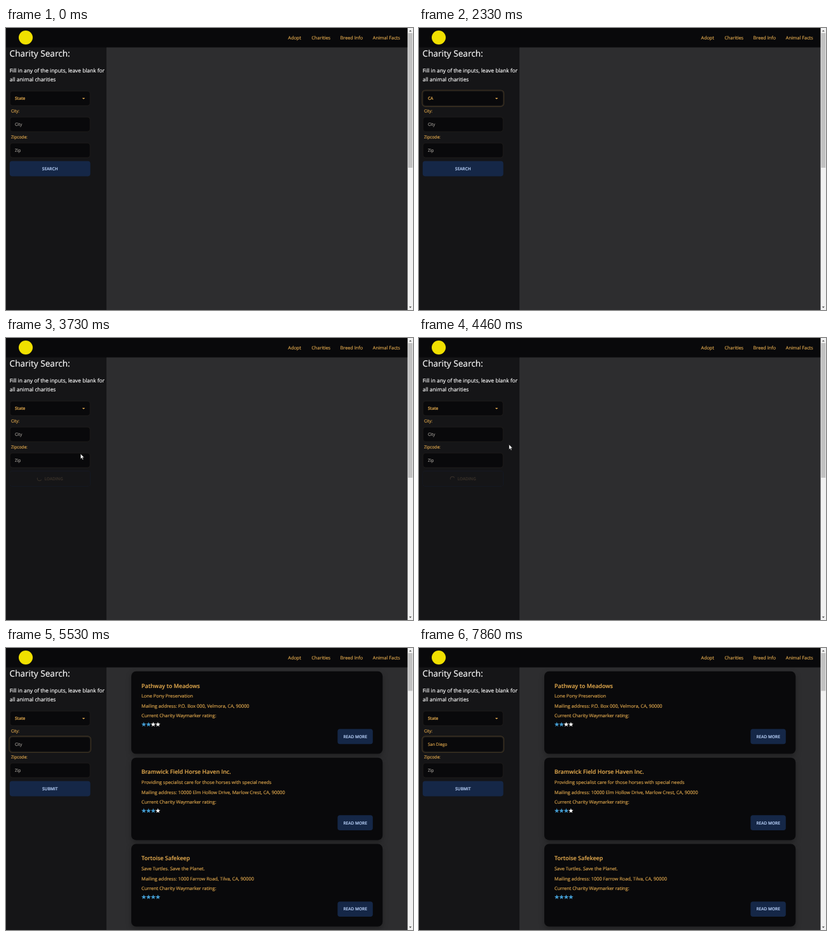
An HTML page for the animation above (8000 ms loop, 640 by 444 pixels).

```html
<!DOCTYPE html>
<html lang="en">
<head>
<meta charset="utf-8">
<title>Charity search</title>
<style>
  html, body { margin: 0; width: 100%; height: 100%; overflow: hidden; background: #2d2d2f; }
  svg { display: block; width: 640px; height: 444px; }
  text { font-family: "Open Sans", "Noto Sans", sans-serif; color: #dca54c; fill: currentColor; stroke: currentColor;
    stroke-width: .17; text-rendering: geometricPrecision; white-space: pre; }
  .semi { font-weight: 600; }
  .mid { text-anchor: middle; }
  .white { color: #fff; }
  .hint { color: #a09c96; }
  .action { color: #b5cdf5; }
  .muted { color: #3a322a; }
  .field { fill: #09090b; stroke: #292523; stroke-width: .6; }
  .focus { fill: none; stroke: #dca54c; stroke-opacity: .22; stroke-width: 1.1; }
  .card { fill: #09090b; filter: drop-shadow(0 4px 4px #0004); }
  .pointer { fill: #fff; stroke: #111; stroke-width: .6; stroke-linejoin: round; }
</style>
</head>
<body>
<svg id="stage" viewBox="0 0 640 444"></svg>
<script>
const LOOP = 8000, LOADING = 3330, RESULTS = 4530, CITY_FOCUS = 5000, HIDE_POINTER = 5530;

const rect = (x, y, w, h, fill, r = 0, more = "") =>
  `<rect x="${x}" y="${y}" width="${w}" height="${h}" rx="${r}" fill="${fill}" ${more}/>`;
const text = (x, y, size, words, cls = "", id = "") =>
  `<text x="${x}" y="${y}" font-size="${size}" class="${cls}" id="${id}">${words}</text>`;
const field = y => rect(6.2, y, 126, 23, "", 4, 'class="field"');
const focusRing = (id, y) => rect(4.9, y - 1.3, 128.6, 25.6, "none", 5, `class="focus" id="${id}"`);
const wideButton = (fill, more) => rect(5.8, 209.6, 126.8, 23.8, fill, 3.8, more);

function star(x, y, fill) {
  const points = Array.from({ length: 10 }, (_, i) => {
    const a = i * Math.PI / 5, r = i % 2 ? 1.65 : 4;
    return [x + r * Math.sin(a), y - r * Math.cos(a)].map(v => v.toFixed(2));
  });
  return `<polygon points="${points.join(" ")}" fill="${fill}"/>`;
}

function card({ name, about, address, stars }, index) {
  const rating = [0, 1, 2, 3].map(i => star(216.7 + i * 7.4, 120.4, i < stars ? "#439bd0" : "#fff"));
  return `<g transform="translate(0 ${index * 135.9})">
    ${rect(197, 36.8, 395.2, 129.8, "", 7.4, 'class="card"')}
    ${text(213, 62.6, 8.95, name, "semi")}
    ${text(213, 78.2, 7.36, about)}
    ${text(213, 93.8, 7.36, "Mailing address: " + address)}
    ${text(213, 109.4, 7.36, "Current Charity Waymarker rating:")}
    ${rating.join("")}
    ${rect(521.4, 127.4, 55.4, 23.8, "#152747", 3.8)}
    ${text(549.1, 141.7, 6.5, "READ MORE", "semi mid action")}</g>`;
}

const charities = [
  { name: "Pathway to Meadows", about: "Lone Pony Preservation", stars: 2,
    address: "P.O. Box 000, Velmora, CA, 90000" },
  { name: "Bramwick Field Horse Haven Inc.", about: "Providing specialist care for those horses with special needs", stars: 3,
    address: "10000 Elm Hollow Drive, Marlow Crest, CA, 90000" },
  { name: "Tortoise Safekeep", about: "Save Turtles. Save the Planet.", stars: 4,
    address: "1000 Farrow Road, Tilva, CA, 90000" }
];
const menu = [["Adopt", 443.6], ["Charities", 480.4], ["Breed Info", 525.6], ["Animal Facts", 576.8]];

stage.innerHTML = `
  ${rect(0, 0, 640, 444, "#2d2d2f")}
  ${rect(0, 30, 158, 414, "#151517")}
  <g id="results">${charities.map(card).join("")}</g>
  ${rect(0, 0, 632, 30.5, "#09090b")}
  <circle cx="31" cy="15" r="11" fill="#f0e000"/>
  ${menu.map(([label, x]) => text(x, 17.9, 7.3, label)).join("")}
  ${text(5.6, 45.1, 13.6, "Charity Search:", "white")}
  ${text(5.8, 70, 8.35, "Fill in any of the inputs, leave blank for", "white")}
  ${text(5.8, 83.6, 8.35, "all animal charities", "white")}
  ${field(99.3)}${field(140.2)}${field(181.1)}
  ${focusRing("stateRing", 99.3)}${focusRing("cityRing", 140.2)}
  ${text(14, 113.1, 6.5, "", "semi", "state")}
  <path d="M119.8 109.9h4.4l-2.2 2.3z" fill="#dca54c"/>
  ${text(7.9, 133.4, 6.55, "City:")}
  ${text(14, 154.3, 6.5, "", "", "city")}
  ${text(7.9, 174.3, 6.55, "Zipcode:")}
  ${text(14, 195.2, 6.5, "Zip", "hint")}
  ${wideButton("#152747")}
  ${wideButton("#0e1b33", 'id="hover"')}
  ${text(69.2, 223.8, 6.5, "", "semi mid action", "submit")}
  <g id="disabled">
    ${wideButton("#151517")}
    ${text(69.2, 223.8, 6.5, "SUBMIT", "semi mid muted", "disabledLabel")}
    <path id="spinner" d="M2.4 -2.4A3.4 3.4 0 0 1 -2.4 2.4" fill="none" stroke="#3a322a" stroke-width=".95"/>
  </g>
  ${rect(631.5, 0, 8.5, 444, "#f1f1f1")}
  ${rect(632.4, 8, 6.8, 212, "#c1c1c1", 0, 'id="thumb"')}
  <path d="M633.8 5.6h4l-2-2.4zM633.8 438.6h4l-2 2.4z" fill="#505050"/>
  <g id="pointer">
    <path id="arrow" class="pointer" d="M0 0V8.2L1.9 6.5 3.2 9.4 4.5 8.8 3.2 6H5.7z"/>
    <path id="hand" class="pointer" d="M-.8 .8Q0-.5 .9 .8V3.8L4.2 4.6Q5.4 5 5.3 6.2L4.5 10H-.2L-2.8 6.5Q-2.6 5.2-.8 6.4z"/>
    <path id="beam" d="M-1.5-4Q0-4 0-3 0-4 1.5-4M0-3V3M-1.5 4Q0 4 0 3 0 4 1.5 4" fill="none" stroke="#ddd" stroke-width=".6"/>
  </g>`;

const el = Object.fromEntries([...stage.querySelectorAll("[id]")].filter(e => e.id).map(e => [e.id, e]));
const show = (node, on) => node.style.display = on ? "" : "none";
const clamp = v => Math.max(0, Math.min(1, v));
const ease = v => v * v * (3 - 2 * v);

// time, x, y of the pointer tip
const route = [
  [660, 92.8, 108], [2700, 62, 165], [3130, 50, 223], [3400, 50, 223],
  [3900, 141.5, 167.5], [4460, 141.5, 167.5], [4530, 140.8, 167.5], [4600, 140.8, 167.5], [4800, 92, 152]
];
function pointerAt(t) {
  if (t < 2130) return route[0].slice(1);
  const next = route.findIndex(stop => stop[0] > t);
  if (next < 0) return route.at(-1).slice(1);
  const [t0, x0, y0] = route[next - 1], [t1, x1, y1] = route[next];
  const k = ease((t - t0) / (t1 - t0));
  return [x0 + (x1 - x0) * k, y0 + (y1 - y0) * k];
}

const keyTimes = [5660, 5860, 6000, 6130, 6400, 6600, 7000, 7060, 7200];

function draw(t) {
  const done = t >= RESULTS - 5, loading = t >= LOADING && !done;

  el.state.textContent = t >= 2330 && t < LOADING ? "CA" : "State";
  show(el.stateRing, t >= 1060 && t < 2730);
  show(el.cityRing, t >= CITY_FOCUS);
  const typed = "San Diego".slice(0, keyTimes.filter(k => t >= k).length);
  el.city.textContent = typed || "City";
  el.city.setAttribute("class", typed ? "" : "hint");

  show(el.results, done);
  el.thumb.setAttribute("height", done ? 59.5 : 212);
  el.submit.textContent = done ? "SUBMIT" : "SEARCH";
  el.hover.style.opacity = t < LOADING ? clamp((t - 2980) / 200) : 0;
  el.disabled.style.opacity = loading ? 1 : done ? 1 - clamp((t - 4560) / 200) : 0;
  el.disabledLabel.textContent = loading ? "LOADING" : "SUBMIT";
  el.disabledLabel.setAttribute("x", loading ? 75 : 69.2);
  show(el.spinner, loading);
  el.spinner.setAttribute("transform", `translate(52.6 221.5) rotate(${(t - LOADING) * .18})`);

  const [x, y] = pointerAt(t);
  const overSelect = t < 2130, overButton = t < 3600 && y > 209;
  const overCity = t > 4600 && x < 132 && y < 163;
  show(el.pointer, t >= 660 && t < 2130 || t >= 2730 && t < HIDE_POINTER);
  el.pointer.setAttribute("transform", `translate(${x} ${y})`);
  show(el.hand, overSelect || overButton);
  show(el.beam, overCity);
  show(el.arrow, !overSelect && !overButton && !overCity);
}

function tick() {
  draw(performance.now() % LOOP);
  requestAnimationFrame(tick);
}
tick();
</script>
</body>
</html>
```
